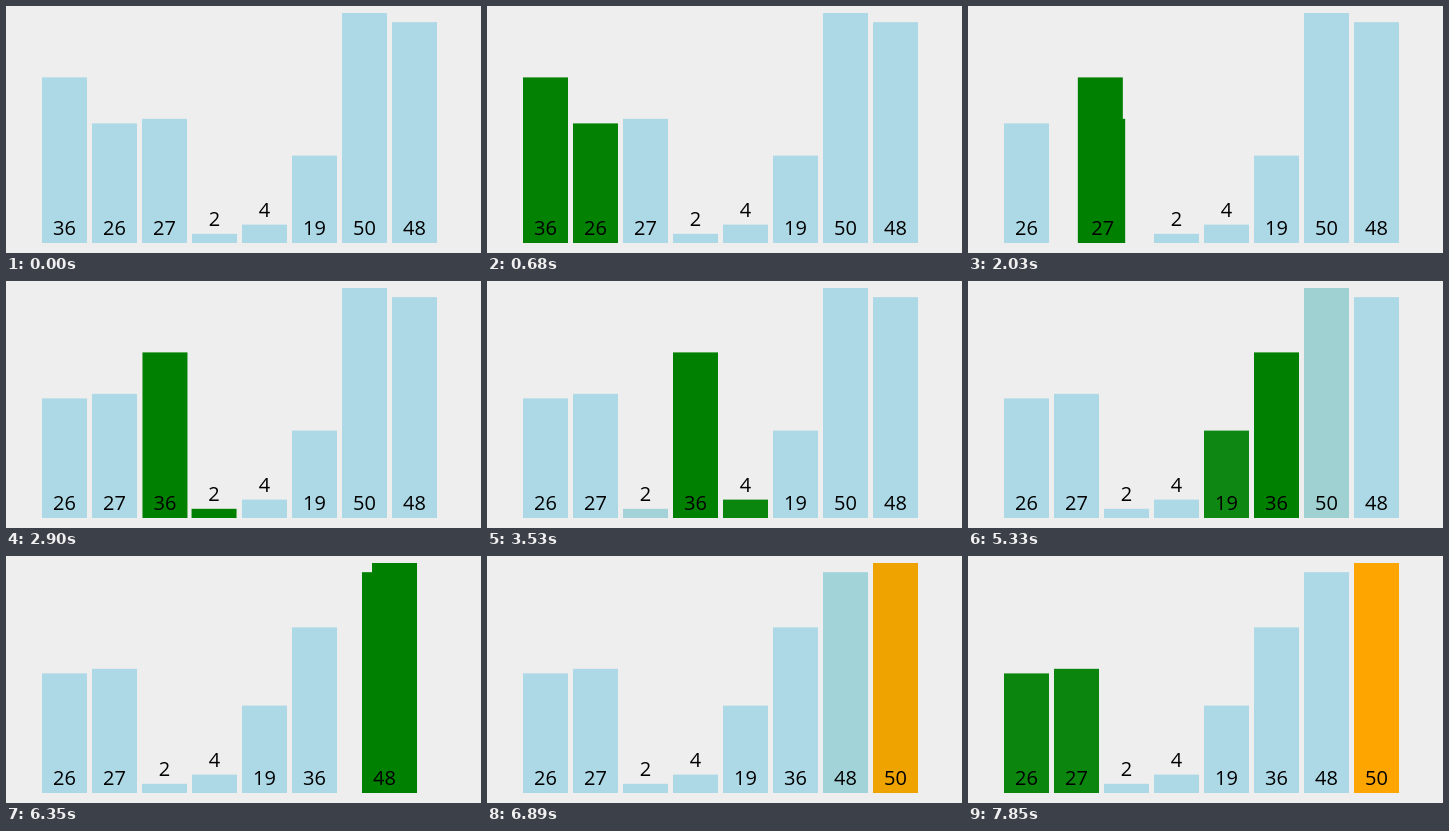
These frames come from a looping animation (475x247 px, 8 s). An HTML page:

```html
<!DOCTYPE html>
<html lang="en">
<head>
<meta charset="utf-8">
<title>Bubble sort</title>
<style>
  html, body { margin: 0; width: 100%; height: 100%; overflow: hidden; background: #eee; }
  svg { display: block; }
  text { font: 20px "Open Sans", "Noto Sans", sans-serif; text-anchor: middle; }
</style>
</head>
<body>
<svg id="chart" width="475" height="247"></svg>
<script>
const LOOP = 8000, TICK = 30, LAST_CHANGE = 7850, DURATION = 250;
const BASE = 237, LEFT = 36, PITCH = 50, WIDTH = 45, UNIT = 4.6;
const BLUE = [173, 216, 230], GREEN = [0, 128, 0], ORANGE = [255, 165, 0];
const values = [36, 26, 27, 2, 4, 19, 50, 48];

// [start, action, position of the left bar of the pair]
const events = [
  [467, 'compare', 0], [947, 'swap', 0],
  [1427, 'compare', 1], [1907, 'swap', 1],
  [2412, 'compare', 2], [2867, 'swap', 2],
  [3340, 'compare', 3], [3827, 'swap', 3],
  [4302, 'compare', 4], [4770, 'swap', 4],
  [5262, 'compare', 5],
  [5742, 'compare', 6], [6216, 'swap', 6],
  [6702, 'finish', 7],
  [7662, 'compare', 0]
];

const chart = document.getElementById('chart');
const add = (parent, tag, attrs) => {
  const el = document.createElementNS('http://www.w3.org/2000/svg', tag);
  for (const name in attrs) el.setAttribute(name, attrs[name]);
  return parent.appendChild(el);
};
const views = values.map(value => {
  const height = value * UNIT;
  const group = add(chart, 'g');
  const rect = add(group, 'rect', { y: BASE - height, width: WIDTH, height });
  const label = add(group, 'text', { x: WIDTH / 2, y: BASE - 8 - (height < 25 ? height : 0) });
  label.textContent = value;
  return { group, rect };
});

const ease = p => p < 0.5 ? 4 * p ** 3 : 1 - 4 * (1 - p) ** 3;
const mix = (a, b, k) => a + (b - a) * k;

function stateAt(time) {
  const bars = values.map((_, i) => ({ x: LEFT + i * PITCH, color: BLUE }));
  const order = [...bars];
  let sorted = values.length;
  for (const [start, action, pos] of events) {
    if (time < start) break;
    const k = ease(Math.min(1, (time - start) / DURATION));
    if (action === 'swap') {
      [order[pos], order[pos + 1]] = [order[pos + 1], order[pos]];
      for (const i of [pos, pos + 1]) order[i].x = mix(order[i].x, LEFT + i * PITCH, k);
      continue;
    }
    if (action === 'finish') sorted = pos;
    order.forEach((bar, i) => {
      const active = action === 'compare' && (i === pos || i === pos + 1);
      const target = i >= sorted ? ORANGE : active ? GREEN : BLUE;
      bar.color = bar.color.map((c, n) => mix(c, target[n], k));
    });
  }
  return bars;
}

function draw(now) {
  const ticked = Math.floor((now % LOOP - 20) / TICK) * TICK + 20;
  stateAt(Math.min(ticked, LAST_CHANGE)).forEach(({ x, color }, i) => {
    views[i].group.setAttribute('transform', `translate(${x})`);
    views[i].rect.setAttribute('fill', `rgb(${color.map(Math.round)})`);
  });
}

let origin;
function frame(now) {
  origin ??= now;
  draw(now - origin);
  requestAnimationFrame(frame);
}
draw(0);
requestAnimationFrame(frame);
</script>
</body>
</html>
```
